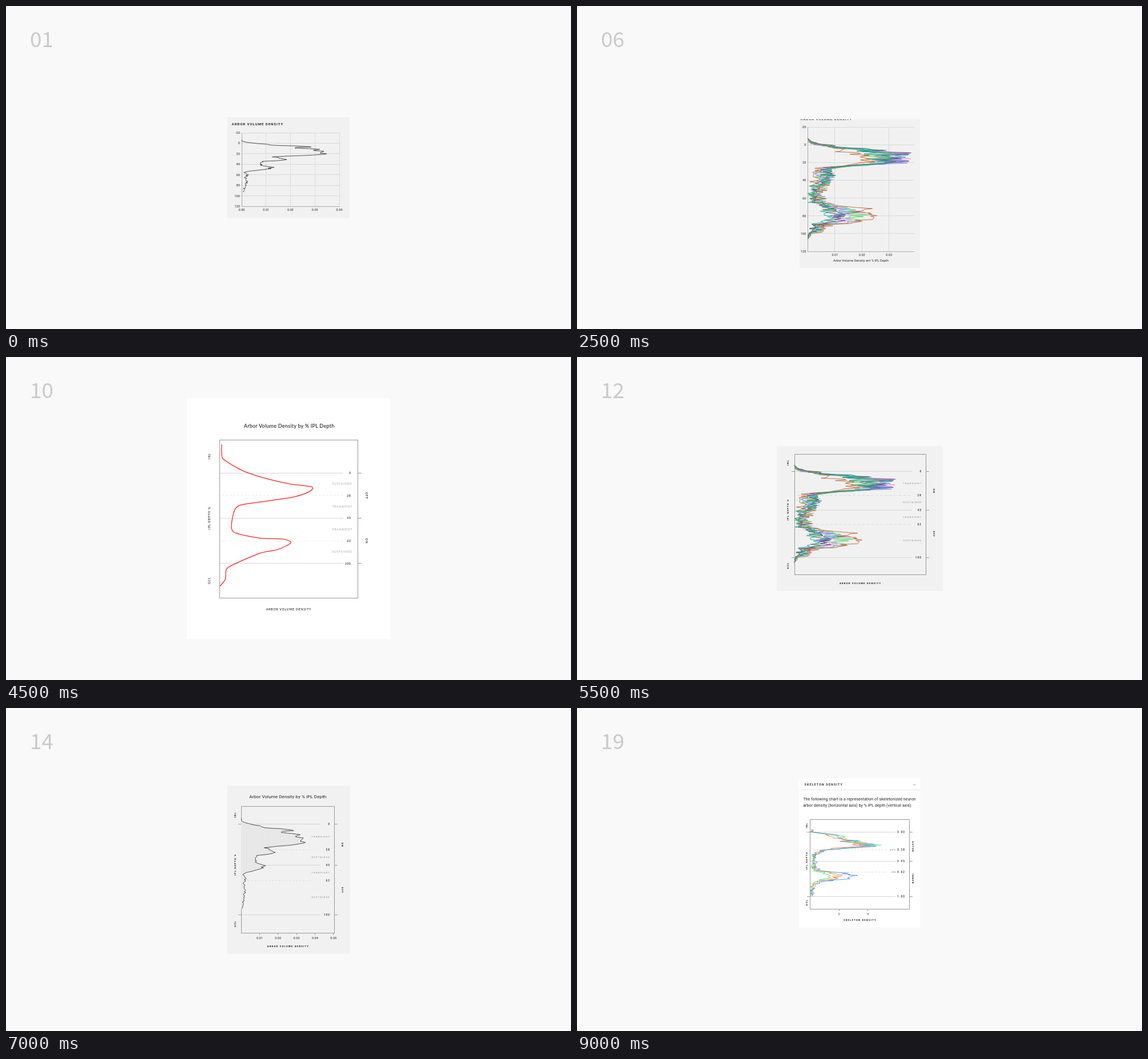
An HTML page for the animation above (9500 ms loop, 990 px wide and 566 px high).

```html
<!DOCTYPE html>
<html lang="en">
<head>
<meta charset="utf-8">
<title>Density chart iterations</title>
<style>
  html, body { margin: 0; width: 100%; height: 100%; overflow: hidden; background: #f9f9f9; }
  svg { display: block; }
  path { fill: none; stroke-linejoin: round; stroke-linecap: round; }
</style>
</head>
<body>
<svg id="stage" width="990" height="566" viewBox="0 0 990 566"></svg>
<script>
const ROBOTO = 'Roboto, sans-serif', LATO = 'Lato, sans-serif';
const DIGITS = "'Noto Sans CJK JP', 'Noto Sans CJK SC', 'Noto Sans CJK', 'Noto Sans', sans-serif";
const AREA = 'ARBOR VOLUME DENSITY', TITLE = 'Arbor Volume Density by % IPL Depth';
const HOLD = 500, CARD = '#f1f1f1';

// Drawing helpers; text is placed by the middle of its capitals.
function text(x, y, str, o = {}) {
  const { size = 5.6, ls = 0, weight = 400, fill = '#222', anchor = 'middle', font = ROBOTO, rot = 0 } = o;
  const dx = { start: 0, middle: ls / 2, end: ls }[anchor];
  return `<text x="${x + dx}" y="${y + size * .357}" font-family="${font}" font-size="${size}" font-weight="${weight}"
    letter-spacing="${ls}" fill="${fill}" text-anchor="${anchor}" transform="rotate(${rot} ${x} ${y})">${str}</text>`;
}
const snap = v => Math.floor(v) + .5;
const line = (x1, y1, x2, y2, color = '#dadada', dash = 'none') =>
  `<path d="M${snap(x1)} ${snap(y1)}L${snap(x2)} ${snap(y2)}" stroke="${color}" stroke-dasharray="${dash}"/>`;
const rect = (x1, y1, x2, y2, fill, more = '') =>
  `<rect x="${x1}" y="${y1}" width="${x2 - x1}" height="${y2 - y1}" fill="${fill}" ${more}/>`;
const place = (body, dx, dy, s = 1) =>
  `<g transform="translate(${495 * (1 - s) + dx} ${283 * (1 - s) + dy}) scale(${s})">${body}</g>`;

function random(seed) {
  return () => (seed = (seed * 16807) % 2147483647) / 2147483647;
}

function interpolate(keys, d) {
  const i = Math.max(1, keys.findIndex(k => k[0] >= d));
  const [d0, v0] = keys[i - 1], [d1, v1] = keys[i];
  return v0 + (v1 - v0) * (d - d0) / (d1 - d0);
}

// A rough trace of [density, depth] around an envelope of [depth, density] keys.
function trace(keys, seed, { upper = 1, lower = 1, rough = .22, grain = .3 } = {}) {
  const rnd = random(seed * 7919 + 17), pts = [];
  rnd();
  for (let d = keys[0][0]; d < keys[keys.length - 1][0]; d += .5 + rnd() * 1.3) {
    const v = interpolate(keys, d) * (d < 45 ? upper : lower);
    const noise = (rnd() + rnd() - 1);
    pts.push([Math.max(0, v * (1 + noise * rough) + noise * Math.min(grain, v)), d]);
  }
  return pts;
}

const single = trace([
  [-6, 0], [-2, .1], [0, .5], [4, 1.4], [6.5, 2.6], [9.5, 2.3], [11, 2.9], [17, 3.4], [21.5, 3.5], [24, 2.4],
  [25.5, 1.4], [32, 1.75], [35, .75], [43, .8], [45.5, 1.4], [50, 1], [54, .12], [60, .25], [66, .12], [74, .24], [80, .13], [94, .08]
], 5, { rough: .11, grain: .07 });

const cells = [
  ['#f7c9a0', .85, .7], ['#ee8af0', 1.05, 1], ['#3b8de8', 1.1, .9], ['#7a3a9a', 1.03, .7],
  ['#1f7a4c', 1.08, .6], ['#15a0a0', .95, .5], ['#3fce5a', .98, 1.15], ['#b9602c', .65, 1.35]
].map(([color, upper, lower], i) => [color, trace([
  [-7, 0], [-2, .15], [1, .7], [7, 2.2], [9, 2.9], [20, 3], [23, 1.9], [26, .9], [30, .6], [43, .65],
  [55, .28], [66, .5], [73, 1.5], [78, 1.7], [87, 1.4], [90, .5], [97, .4], [100, .1], [106, 0]
], i + 1, { upper, lower })]);

const skeletons = [['#ee6055', .8, .95], ['#f5d020', 1, .8], ['#4fe0b0', 1, .6], ['#4a90e2', 1, 1.45]]
  .map(([color, upper, lower], i) => [color, trace([
    [-4, .15], [0, .1], [4, 1.5], [8, 2.2], [15, 3], [22, 4.6], [25, 2.6], [28, 1], [35, .35], [46, .2],
    [60, .4], [64, 1.7], [68, 2.2], [73, 1.7], [76, .8], [81, .25], [100, .08]
  ], i + 21, { upper, lower, rough: .2, grain: .2 })]);

// Traces drawn on axes given by [left, zero depth, x unit, y unit].
const toPath = (pts, [x, y, w, h]) =>
  'M' + pts.map(([v, d]) => `${(x + v * w).toFixed(2)} ${(y + d * h).toFixed(2)}`).join('L');
const drawSet = set => axes => set.map(([color, pts]) =>
  `<path d="${toPath(pts, axes)}" stroke="${color}" stroke-width=".85"/>`).join('');
const one = drawSet([['#333', single]]), many = drawSet(cells), bones = drawSet(skeletons);
const shaded = axes =>
  `<path d="${toPath([[0, single[0][1]], ...single, [0, single[single.length - 1][1]]], axes)}Z" style="fill:url(#hatch)"/>` + one(axes);

// Grid charts with depth from -20 to 120.
function grid(x0, x1, y0, y1, unit, ticks, draw) {
  const h = (y1 - y0) / 140;
  let out = '';
  for (let d = -20; d <= 120; d += 20) {
    const y = y0 + (d + 20) * h;
    out += line(x0, y, x1, y) + text(x0 - 3.2, y, d, { anchor: 'end' });
  }
  ticks.forEach(n => {
    const x = x0 + n * unit;
    out += line(x, y0, x, y1) + text(x, y1 + 5.6, '0.0' + n);
  });
  return out + line(x0, y0, x0, y1, '#aaa') + line(x0, y1, x1, y1, '#aaa') + draw([x0, y0 + 20 * h, unit, h]);
}
const heading = (x, y) => text(x, y, AREA, { size: 6, ls: .99, weight: 700, anchor: 'start' });
const small = draw => rect(388, 195, 602, 371.5, CARD) + heading(395.5, 206.7) +
  grid(413, 584, 222, 351, 42.75, [0, 1, 2, 3, 4], draw);
const tall = draw => rect(390, 153.5, 601, 414, CARD) + heading(391.5, 152.4) + rect(388, 146, 604, 153.5, '#f9f9f9') +
  grid(404.5, 590, 167, 385, 47.4, [1, 2, 3], draw) +
  text(497.5, 401, 'Arbor Volume Density wrt % IPL Depth', { ls: .08 });

// Framed charts: five depth rows, with zones and side labels centred between them.
const EVEN = [0, .25, .5, .75, 1], TRUE = [0, .28, .45, .62, 1];
function framed(o) {
  const { box: [x0, y0, x1, y1], zero, span, rows = TRUE, gap = 25, dashGap = gap, tick = 5, left = 5, inset = 8 } = o;
  const style = { size: 4.2, ls: 1.2, ...o.style };
  const side = { weight: 700, fill: '#111', ...style };
  const mark = { ...style, size: 4.6, weight: 500, anchor: 'end', ...o.mark };
  const ys = rows.map(r => zero + r * span), mid = (a, b) => (a + b) / 2;
  const { marks = ['0', '28', '45', '62', '100'], sides: [upper, lower] = ['ON', 'OFF'], sideGap: [gapL, gapR], depth = 'IPL DEPTH %' } = o;
  let out = '';
  ys.forEach((y, i) => {
    if (i % 2) out += line(x0 + 6, y, x1 - dashGap, y, '#dcdcdc', o.dash || '4 4');
    else {
      out += line(x0, y, x1 - gap, y, '#d6d6d6');
      if (tick) out += line(x1, y, x1 + tick, y, '#999');
      if (left && i !== 2) out += line(x0 - left, y, x0, y, '#999');
    }
    out += text(o.markX || x1 - inset, y, marks[i], mark);
  });
  out += rect(snap(x0), snap(y0), snap(x1), snap(y1), 'none', 'stroke="#999"') + o.curves([x0, zero, o.unit, span / 100]);
  const zone = { ...style, fill: o.zoneFill || '#8c8c8c', anchor: 'end' };
  (o.zones || []).forEach((z, i) => { out += text(x1 - inset, mid(ys[i], ys[i + 1]) - .5, z, zone); });
  (o.rowNotes || []).forEach((z, i) => { out += text(x1 - 24, ys[i * 2 + 1], z, zone); });
  [['INL', mid(y0, ys[0])], [depth, ys[2]], ['GCL', mid(ys[4], y1)]]
    .forEach(([s, y]) => { out += text(x0 - gapL, y, s, { ...side, rot: -90 }); });
  [[upper, mid(ys[0], ys[2])], [lower, mid(ys[2], ys[4])]]
    .forEach(([s, y]) => { out += text(x1 + gapR, y, s, { ...side, rot: 90 }); });
  return out + text(mid(x0, x1), y1 + o.nameGap, o.name || AREA, side);
}
const lateSustained = ['TRANSIENT', 'SUSTAINED', 'TRANSIENT', 'SUSTAINED'];
const outerSustained = ['SUSTAINED', 'TRANSIENT', 'TRANSIENT', 'SUSTAINED'];

// The hand-drawn curve: a spline through key points as [share of width, share of height].
const sketchKeys = [
  [.016, .03], [.018, .105], [.04, .13], [.14, .183], [.22, .213], [.36, .25], [.52, .28], [.67, .298], [.645, .33], [.53, .362],
  [.3, .392], [.14, .416], [.1, .47], [.088, .56], [.13, .592], [.3, .621], [.455, .626], [.517, .649],
  [.425, .692], [.3, .714], [.12, .78], [.052, .815], [.042, .88], [.005, .922]];
function spline(p) {
  return 'M' + p[0] + p.slice(1).map((c, i) => {
    const b = p[i], a = p[i - 1] || b, e = p[i + 2] || c;
    return `C${b.map((v, k) => v + (c[k] - a[k]) / 7)} ${c.map((v, k) => v - (e[k] - b[k]) / 7)} ${c}`;
  }).join('');
}
const sketch = ([x0, y0, x1, y1]) => () =>
  `<path d="${spline(sketchKeys.map(([u, v]) => [x0 + u * (x1 - x0), y0 + v * (y1 - y0)]))}" stroke="#f32020" stroke-width="1.25"/>`;
const hand = {
  rows: EVEN, sides: ['OFF', 'ON'], zones: outerSustained, left: 0, inset: 10, dash: '.8 5.7', nameGap: 19.6,
  style: { font: LATO, size: 5.2, ls: .8, weight: 500 }, mark: { size: 5.6, ls: .2 }
};
const handTitle = (x, y) => text(x, y, TITLE, { font: LATO, size: 9, ls: .24, weight: 500 });

const wideBox = [371, 155, 616, 437], neatBox = [374, 145, 616, 422.8];
const wideSketch = rect(314, 82.5, 676, 483.5, '#fff') + handTitle(495, 131) + framed({
  ...hand, box: wideBox, zero: 214, span: 161, gap: 0, dashGap: 14, tick: 0, markX: 358, zoneFill: '#333',
  sideGap: [38, 16.4], curves: sketch(wideBox)
});
const neatSketch = rect(317, 72.5, 673, 494, '#fff') + handTitle(496, 121) + framed({
  ...hand, box: neatBox, zero: 203, span: 158.7, gap: 26, tick: 6, markX: 604, zoneFill: '#aaa',
  sideGap: [18, 15.5], curves: sketch(neatBox)
});
const square = curves => rect(350, 156, 641, 410, CARD) + framed({
  box: [381, 170.5, 611, 381], zero: 200.5, span: 150.5, unit: 46.3, zones: lateSustained,
  sideGap: [11.5, 14], nameGap: 16, curves
});

function ticks(x0, y, unit, labels, size, gap) {
  return labels.map(([n, label]) => {
    const x = x0 + n * unit;
    return line(x, y, x, y + 3, '#999') + text(x, y + gap, label, { size });
  }).join('');
}
const column = curves => rect(388, 136.3, 603, 430.7, CARD) + text(493.7, 155, TITLE, { size: 8, ls: .1 }) + framed({
  box: [412, 172, 575.5, 394.5], zero: 203.5, span: 159, unit: 32.35, zones: lateSustained, inset: 8.5,
  dashGap: 38, dash: '2 4', sideGap: [10.7, 13.5], nameGap: 23.3, curves
}) + ticks(412, 394.5, 32.35, [1, 2, 3, 4, 5].map(n => [n, '0.0' + n]), 5.6, 8.8);

const story = ['The following chart is a representation of skeletonized neuron', 'arbor density (horizontal axis) by % IPL depth (vertical axis).'];
const skeleton = rect(388.7, 123, 601.7, 385, '#fff', 'rx="2"') +
  text(398.5, 134.4, 'SKELETON DENSITY', { size: 5.4, ls: 1.1, weight: 600, fill: '#333', anchor: 'start' }) +
  line(589, 134, 593, 134, '#aaa') + line(389, 143, 601, 143, '#e8e8e8') +
  story.map((t, i) => text(396.2, 159.8 + i * 10.5, t, { size: 7, ls: .095, anchor: 'start' })).join('') +
  framed({
    box: [408.5, 195, 582, 352.5], zero: 217.3, span: 112.7, unit: 25.3, dashGap: 41, dash: '2 4',
    marks: ['0.00', '0.28', '0.45', '0.62', '1.00'], rowNotes: ['OFF', 'ON'], zoneFill: '#666',
    sides: ['OUTER', 'INNER'], depth: 'IPL DEPTH', sideGap: [6, 6.5], nameGap: 18.7, name: 'SKELETON DENSITY', curves: bones
  }) + ticks(408.5, 352.5, 25.3, [[2, 2], [4, 4]], 4.8, 8.7);

const slides = [
  small(one),
  small(many),
  place(tall(one), 4, 11),
  tall(many),
  tall(one),
  place(tall(many), 0, 45),
  place(tall(one), 0, 30),
  wideSketch,
  place(neatSketch, -205, 0) + place(neatSketch, 205, 0),
  neatSketch,
  place(neatSketch, 0, 11, 1.185),
  square(many),
  place(square(many), -1, 15),
  column(many),
  column(shaded),
  column(many),
  place(column(shaded), 0, 0, 1.2),
  place(skeleton, 0, 12),
  skeleton
];

const stage = document.getElementById('stage');
stage.innerHTML = `<defs><pattern id="hatch" width="2.5" height="2.5" patternUnits="userSpaceOnUse">
  <rect width="2.5" height="2.5" fill="#ededed"/><rect width="1" height="2.5" fill="#e0e0e0"/></pattern></defs>` +
  slides.map((body, i) => {
    const number = String(i === 14 ? 14 : i + 1).padStart(2, '0');
    return `<g class="slide" visibility="hidden">
      <text x="42" y="71.7" font-family="${DIGITS}" font-size="37" fill="#cacaca">${number}</text>${body}</g>`;
  }).join('');

const groups = stage.querySelectorAll('.slide');
function show(now) {
  const current = Math.floor(now / HOLD) % groups.length;
  groups.forEach((g, i) => g.setAttribute('visibility', i === current ? 'visible' : 'hidden'));
  requestAnimationFrame(() => show(performance.now()));
}
show(0);
</script>
</body>
</html>
```
